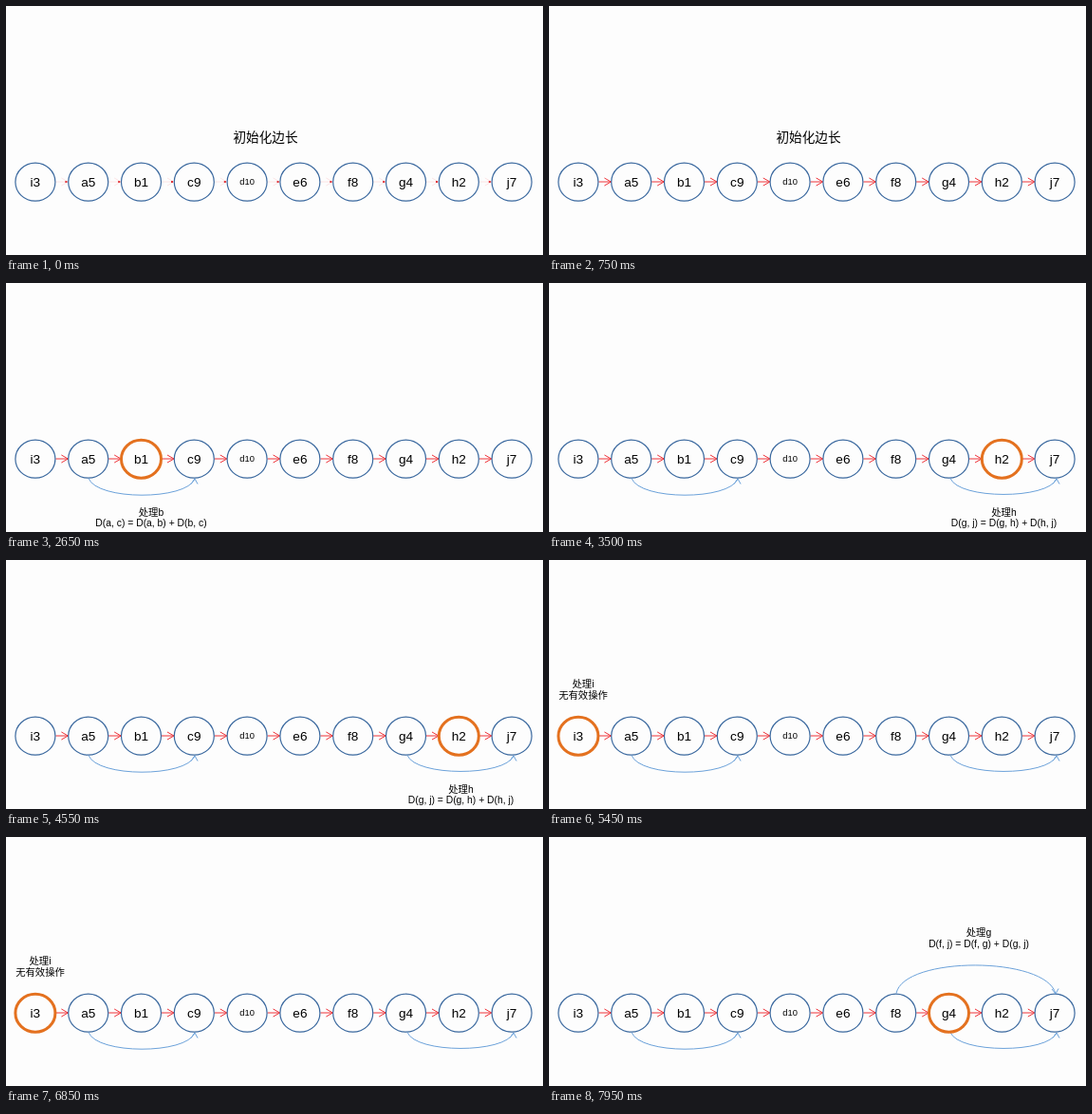
An HTML page that plays this animation: 566 by 262 pixels, repeating every 8 s.

```html
<!DOCTYPE html>
<html lang="zh">
<head>
<meta charset="utf-8">
<style>
  html, body { margin: 0; width: 100%; height: 100%; overflow: hidden; background: #fdfdfd; }
  svg { display: block; width: 566px; height: 262px; }
  text { font-family: "Liberation Sans", "Noto Sans CJK SC", "Noto Sans CJK", sans-serif; text-anchor: middle; fill: #000; }
  path, ellipse { fill: none; }
  .node { stroke: #3b699f; stroke-width: 1.2; }
  .ring { stroke: #e4711f; stroke-width: 3; }
  .edge { stroke: #ee3238; stroke-width: 1; }
  .arc { stroke: #6ca2da; stroke-width: 1; }
</style>
</head>
<body>
<svg id="stage" viewBox="0 0 566 262"></svg>
<script>
const LOOP = 8000;
const stage = document.getElementById('stage');
const nodes = ['i3', 'a5', 'b1', 'c9', 'd10', 'e6', 'f8', 'g4', 'h2', 'j7'];
const nodeX = i => 30.9 + 55.8 * i;
const NODE_Y = 185.2;

const steps = [
  { start: 1000, node: 2, x: 153, y: 244.5, lines: ['处理b', 'D(a, c) = D(a, b) + D(b, c)'],
    arc: 'M87 205.5C96 229 190 229 199 206', head: 'M195 211.5L199 206L202 211.5' },
  { start: 3100, node: 8, x: 479.5, y: 244.5, lines: ['处理h', 'D(g, j) = D(g, h) + D(h, j)'],
    arc: 'M423 205.5C432 228 526 228 535 206', head: 'M531 211.5L535 206L538 211.5' },
  { start: 5200, node: 0, x: 36, y: 134, lines: ['处理i', '无有效操作'] },
  { start: 7300, node: 7, x: 453, y: 104, lines: ['处理g', 'D(f, j) = D(f, g) + D(g, j)'],
    arc: 'M366 164.5C374 125 524 125 534 165', head: 'M530 160L534 165L537 159.5' }
];

function add(parent, tag, attrs, content = '') {
  const el = document.createElementNS('http://www.w3.org/2000/svg', tag);
  for (const key in attrs) el.setAttribute(key, attrs[key]);
  el.textContent = content;
  return parent.appendChild(el);
}

function label(parent, x, y, size, content) {
  return add(parent, 'text', { x, y, 'font-size': size }, content);
}

const progress = (t, start, duration) => Math.min(1, Math.max(0, (t - start) / duration));

const title = label(stage, 273.5, 143, 13.6, '初始化边长');
const edges = add(stage, 'g', {});
const dots = add(stage, 'g', {});

nodes.forEach((name, i) => {
  const x = nodeX(i);
  add(stage, 'ellipse', { class: 'node', cx: x, cy: NODE_Y, rx: 21, ry: 20 });
  label(stage, x, name.length > 2 ? 188.2 : 189.9, name.length > 2 ? 9.4 : 13.6, name);
  if (i === nodes.length - 1) return;
  add(edges, 'path', { class: 'edge', d: `M${x + 21.5} 185H${x + 34.5}m-7 -4l7 4l-7 4` });
  add(dots, 'rect', { x: x + 31.5, y: 184, width: 2, height: 2, fill: '#e0343a' });
});

for (const step of steps) {
  step.focus = add(stage, 'g', {});
  add(step.focus, 'ellipse', { class: 'ring', cx: nodeX(step.node), cy: NODE_Y, rx: 21, ry: 20 });
  step.lines.forEach((line, i) => label(step.focus, step.x, step.y + i * 11.8, 10.35, line));
  if (!step.arc) continue;
  step.curve = add(stage, 'path', { class: 'arc', d: step.arc, pathLength: 1, 'stroke-dasharray': '1 2' });
  step.tip = add(stage, 'path', { class: 'arc', d: step.head });
}

const show = (el, visible) => el.style.display = visible ? '' : 'none';

function draw(t) {
  show(title, t < steps[0].start);
  const reveal = progress(t, 0, 400);
  edges.style.opacity = 0.12 + 0.88 * reveal;
  dots.style.opacity = 1 - reveal;
  steps.forEach((step, i) => {
    const end = steps[i + 1]?.start ?? LOOP;
    show(step.focus, t >= step.start && t < end);
    if (!step.arc) return;
    const drawn = progress(t, step.start, 300);
    show(step.curve, drawn > 0);
    step.curve.setAttribute('stroke-dashoffset', 1 - drawn);
    show(step.tip, drawn === 1);
  });
}

function frame() {
  draw(performance.now() % LOOP);
  requestAnimationFrame(frame);
}
frame();
</script>
</body>
</html>
```
